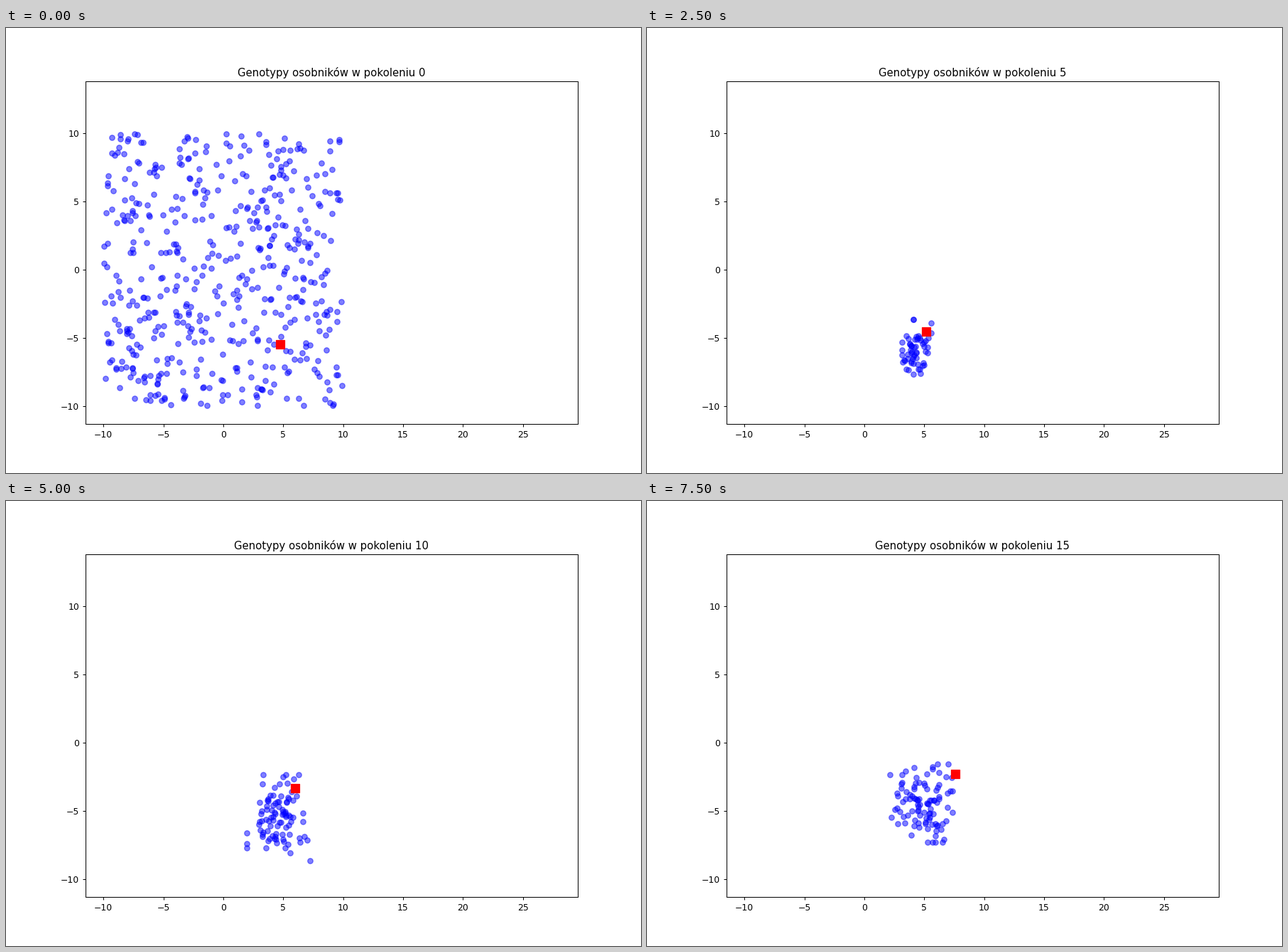
These frames come from a looping animation (894 by 626 pixels, 8000 ms). A matplotlib script:

```python
import matplotlib.pyplot as plt
import numpy as np
from matplotlib.animation import FuncAnimation

GENERATIONS = 16
STEP_MS = 500
FIRST_SIZE = 500

# Crowd at a few generations: centre x, y, spread x, y.
KEYS = [1, 5, 9, 15]
CROWD = [
    (4.5, -6.0, 0.35, 0.5),
    (4.35, -5.85, 0.65, 1.0),
    (4.6, -5.7, 1.2, 1.45),
    (4.7, -4.4, 1.2, 1.3),
]

# The optimum drifts through these points.
GOAL_KEYS = [0, 1, 9, 11, 13, 15]
GOAL = [(4.72, -5.43), (4.62, -5.40), (5.69, -3.67),
        (6.26, -2.97), (6.97, -2.78), (7.60, -2.27)]


def along(t, keys, rows):
    return np.array([np.interp(t, keys, column) for column in zip(*rows)])


def crowd_size(gen):
    return round(100 * (1 - np.exp(-(gen / 5.6) ** 1.6)))


def population(gen):
    rng = np.random.default_rng(40 + gen)
    if gen == 0:
        return rng.uniform(-10, 10, (FIRST_SIZE, 2))
    state = along(gen, KEYS, CROWD)
    offsets = rng.normal(size=(crowd_size(gen), 2)).clip(-2.2, 2.2)
    return state[:2] + offsets * state[2:]


fig, ax = plt.subplots(figsize=(10.0001, 7.0023), dpi=89.4)
ax.set_xlim(-11.51, 29.56)
ax.set_ylim(-11.30, 13.82)
ax.set_xticks(range(-10, 30, 5))
ax.set_yticks(range(-10, 15, 5))
dots = ax.scatter([], [], c="blue", alpha=0.5)
goal = ax.scatter([], [], c="red", marker="s", s=100)
title = ax.set_title("")


def update(gen):
    dots.set_offsets(population(gen))
    goal.set_offsets([along(gen, GOAL_KEYS, GOAL)])
    title.set_text(f"Genotypy osobników w pokoleniu {gen}")
    return dots, goal, title


anim = FuncAnimation(fig, update, frames=GENERATIONS, interval=STEP_MS,
                     repeat=True, repeat_delay=0)
plt.show()
```
